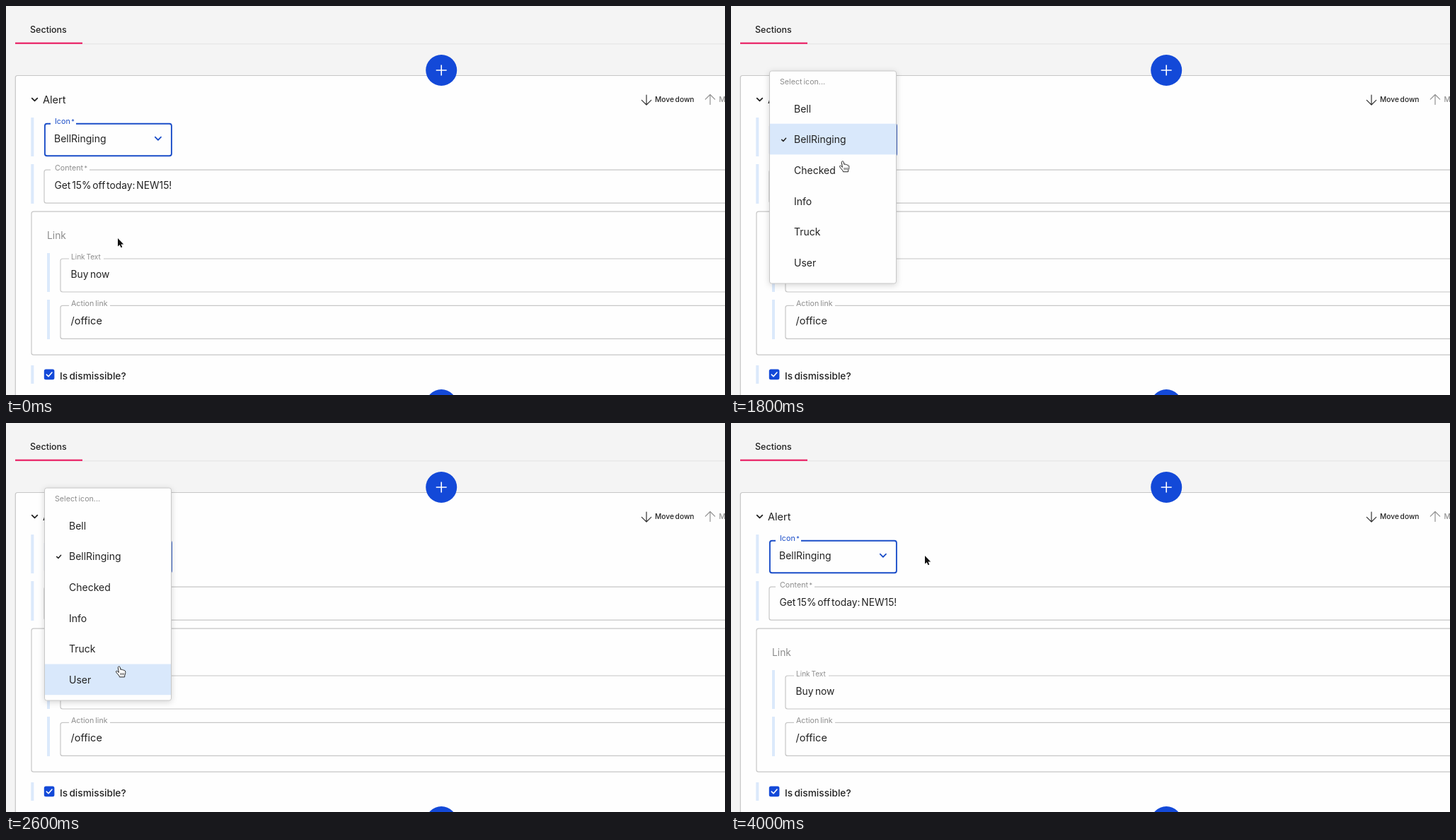
These frames come from a looping animation (1016 by 551 pixels, 4.57 s). An HTML page:

```html
<!DOCTYPE html>
<html lang="en">
<head>
<meta charset="utf-8">
<title>Icon select</title>
<style>
  html, body { margin: 0; width: 100%; height: 100%; overflow: hidden; background: #f4f4f4; }
  svg { display: block; width: 100%; height: 100%; font-family: Inter, "Open Sans", sans-serif; }
  text { fill: #222; font-size: 14px; word-spacing: -.1em; white-space: pre; }
  .label { font-size: 10.7px; fill: #8d8d8d; }
  .tab { font-size: 12.5px; font-weight: 500; }
  .action { font-size: 10.2px; font-weight: 500; }
  .strong { font-weight: 500; font-size: 13.7px; }
  .line { fill: none; stroke-linecap: round; stroke-linejoin: round; }
  .bar { fill: #dbe9fb; }
  .box { fill: #fefefe; stroke: #c6c6c6; stroke-width: 1.2; }
  .blue { fill: #1349d8; }
  #menu .panel { fill: #fefefe; stroke: #c8c8c8; filter: drop-shadow(0 2px 4px rgba(0, 0, 0, .16)); }
  #menu .row { fill: #d9e8fb; }
</style>
</head>
<body>
<svg id="stage" viewBox="0 0 1016 551" preserveAspectRatio="none">
  <path d="M108 53.8H1016" stroke="#e3e3e3"/>
  <rect x="13" y="51.6" width="95" height="2.2" fill="#e91e63"/>
  <text class="tab" x="34" y="38">Sections</text>
  <rect class="box" x="13.3" y="98.5" width="1020" height="480" rx="3"/>

  <g id="form"></g>

  <path class="line" d="M36.7 130.6L40.5 134.4 44.3 130.6" stroke="#222" stroke-width="1.8"/>
  <text x="52" y="138" style="font-size:14.6px">Alert</text>

  <path class="line" d="M905 126V140M898.3 133.3L905 140 911.7 133.3" stroke="#333" stroke-width="1.2"/>
  <text class="action" x="917" y="136">Move down</text>
  <path class="line" d="M995 139.5V125.5M988.3 132.2L995 125.5 1001.7 132.2" stroke="#929292" stroke-width="1.2"/>
  <text class="action" x="1007.5" y="136" style="fill:#929292">Move up</text>

  <rect x="54.9" y="166.8" width="179" height="45.5" rx="3" fill="#fefefe" stroke="#1a4dc8" stroke-width="1.9"/>
  <rect x="63" y="165" width="36" height="4" fill="#fefefe"/>
  <text class="label" x="69" y="167" style="fill:#1a4dc8">Icon<tspan dx="1.5" font-size="9">*</tspan></text>
  <text x="68" y="193">BellRinging</text>
  <path class="line" d="M210.8 185.7L214.9 189.8 219 185.7" stroke="#1a4dc8" stroke-width="1.8"/>

  <rect class="blue" x="53.8" y="514.6" width="14.6" height="14.6" rx="2.5"/>
  <path class="line" d="M57.3 522.1L60 524.8 65 519" stroke="#fff" stroke-width="1.6"/>
  <text class="strong" x="76" y="529">Is dismissible?</text>

  <circle class="blue" cx="615.2" cy="91" r="22"/>
  <path d="M607.7 91H622.7M615.2 83.5V98.5" stroke="#fff" stroke-width="1.6"/>
  <circle class="blue" cx="615.2" cy="565" r="22"/>

  <g id="menu">
    <rect class="panel" x="54.5" y="92" width="179" height="301" rx="3"/>
    <text class="label" x="69" y="111">Select icon...</text>
  </g>

  <g id="cursor">
    <path id="arrow" d="M0 0V11.6L2.7 9.2 4.5 13.2 6.3 12.4 4.5 8.5H8.2Z" fill="#111" stroke="#fff" stroke-width="1.4" paint-order="stroke"/>
    <g id="hand" stroke="#222" stroke-linejoin="round">
      <path fill="#fff" d="M-1.7 1.6C-2-.3.6-.9 1.1 1L2 4.6C2.6 3.6 4.2 3.8 4.4 5 5 4.2 6.4 4.5 6.6 5.7 7.4 5 8.6 5.6 8.7 6.9 9 9 8.6 10.8 7.8 12.4L7.6 14.8H.4L0 13.2C-1.6 11.8-2.8 9.6-4.4 7.8-5.2 6.6-3.6 5.8-2.6 6.6L-.6 8.4Z"/>
      <path fill="none" stroke-width=".8" d="M2.1 9V12.3M4.2 9V12.3M6.3 9V12.3"/>
    </g>
  </g>
</svg>
<script>
const LOOP = 4570, STEP = 100;
const $ = id => document.getElementById(id);

function add(parent, tag, attrs, text) {
  const el = document.createElementNS('http://www.w3.org/2000/svg', tag);
  for (const key in attrs) el.setAttribute(key, attrs[key]);
  if (text) el.textContent = text;
  return parent.appendChild(el);
}

const form = $('form');

function bar(x, y, height) {
  add(form, 'rect', { class: 'bar', x, y, width: 4, height });
}

function field(x, y, gapX, gapW, label, labelSize, value, valueStyle) {
  add(form, 'rect', { class: 'box', x, y, width: 1000, height: 47, rx: 3 });
  add(form, 'rect', { x: gapX, y: y - 2, width: gapW, height: 4, fill: '#fefefe' });
  const tag = add(form, 'text', { class: 'label', x: x + 15, y: y + .8, style: `font-size:${labelSize}px` }, label);
  add(form, 'text', { x: x + 14.5, y: y + 27, style: valueStyle }, value);
  return tag;
}

bar(35.3, 158, 55);
bar(35.3, 224, 56);
bar(35.3, 509, 26);
add(form, 'rect', { class: 'box', x: 36, y: 291.2, width: 1000, height: 203, rx: 3 });
add(form, 'text', { x: 58, y: 330, style: 'font-size:13.8px;fill:#8d8d8d' }, 'Link');
bar(58, 350, 55);
bar(58, 416, 56);
const content = field(54, 232.2, 63, 55, 'Content', 10.7, 'Get 15% off today: NEW15!', 'font-size:13.8px;word-spacing:-.15em');
add(content, 'tspan', { dx: 1.5, 'font-size': 9 }, '*');
field(77, 358, 89, 49, 'Link Text', 10.1, 'Buy now', 'font-size:13.8px');
field(77, 424.4, 89, 58, 'Action link', 10.7, '/office', 'font-size:14.5px');

// Each row: label, then [time, highlight strength] keys.
const items = [
  ['Bell', [[1300, 0], [1500, 1], [1600, 1], [1800, 0]]],
  ['BellRinging', [[1300, 1], [1500, 0], [1600, 0], [1800, 1], [2000, 0], [2900, 0], [3100, 1], [3400, 1], [3600, 0]]],
  ['Checked', [[1800, 0], [2000, 1], [2200, 0], [2700, 0], [2800, .3], [2900, 0]]],
  ['Info', [[2000, 0], [2200, 1], [2300, .25], [2400, 0], [2600, 0], [2700, .3], [2900, 0]]],
  ['Truck', [[2200, 0], [2300, .75], [2400, 1], [2600, 0], [2700, .3], [2800, 0]]],
  ['User', [[2400, 0], [2500, .7], [2600, 1], [2800, 0]]]
];
const PITCH = 43.7, menu = $('menu');
const rows = items.map(([name, keys], i) => {
  const y = 123 + i * PITCH;
  const el = add(menu, 'rect', { class: 'row', x: 55, y, width: 178, height: PITCH });
  add(menu, 'text', { x: 89, y: y + 27.6 }, name);
  return { el, keys };
});
add(menu, 'path', { class: 'line', d: 'M71.7 189.4L73.9 191.5 77.6 187.2', stroke: '#222', 'stroke-width': 1.5 });

const menuKeys = [[800, 0], [900, 1], [3700, 1], [3800, .65], [3900, .25], [4000, 0]];

// Pointer tip: time, x, y.
const path = [
  [0, 158, 329], [100, 158, 288], [200, 157, 214], [300, 157, 187],
  [1200, 157, 187], [1300, 158, 179], [1400, 160, 154], [1500, 161, 138],
  [1600, 161, 143], [1700, 160, 174], [1800, 158, 220], [1900, 156, 244],
  [2000, 154, 261], [2300, 150, 322], [2400, 151, 344], [2500, 154, 357],
  [2600, 160, 345], [2700, 172, 290], [2800, 187, 222], [2900, 197, 172],
  [3000, 198, 175], [3100, 202, 179], [3300, 223, 184], [3500, 264, 188], [3600, 274, 188]
];

function at(keys, t, n = 1) {
  const i = keys.findIndex(k => k[0] > t);
  if (i === 0) return keys[0][n];
  if (i < 0) return keys[keys.length - 1][n];
  const a = keys[i - 1], b = keys[i];
  return a[n] + (b[n] - a[n]) * (t - a[0]) / (b[0] - a[0]);
}

function draw(time) {
  const t = Math.floor(time % LOOP / STEP) * STEP;
  menu.setAttribute('opacity', at(menuKeys, t));
  rows.forEach(r => r.el.setAttribute('opacity', at(r.keys, t)));
  const x = at(path, t, 1), y = at(path, t, 2);
  $('cursor').setAttribute('transform', `translate(${x} ${y})`);
  const pointing = t >= 300 && x < 234;
  $('hand').style.display = pointing ? '' : 'none';
  $('arrow').style.display = pointing ? 'none' : '';
}

const start = performance.now();
function tick() {
  draw(performance.now() - start);
  requestAnimationFrame(tick);
}
tick();
</script>
</body>
</html>
```
